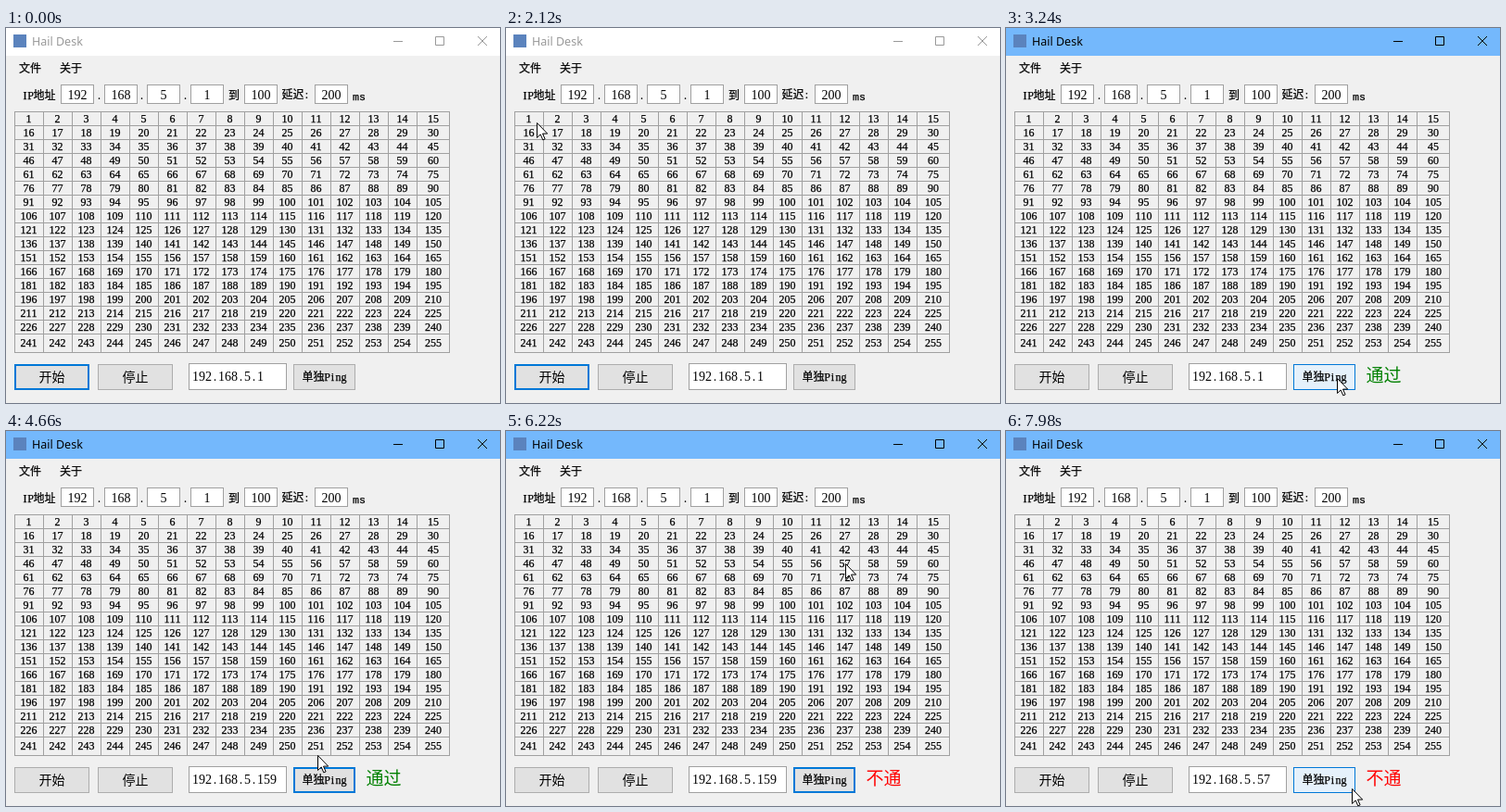
Animation of 533x405 px, one loop 8 s. Source, as an HTML page:

```html
<!DOCTYPE html>
<html lang="zh">
<head>
<meta charset="utf-8">
<title>Hail Desk</title>
<style>
  html, body { margin: 0; width: 100%; height: 100%; overflow: hidden; background: #f0f0f0; }
  svg { display: block; width: 533px; height: 405px; }
  text { font-family: "Liberation Serif", "Noto Sans CJK SC", "Noto Sans CJK", serif; white-space: pre; }
  .ui { font-family: "Noto Sans", "Noto Sans CJK SC", "Noto Sans CJK", sans-serif; }
  .code { font-family: "Liberation Mono", monospace; }
  .ink { stroke: #000; stroke-width: .25px; }
</style>
</head>
<body>
<svg id="stage" viewBox="0 0 533 405"></svg>
<script>
const stage = document.getElementById("stage");
const LOOP = 8000;
const TICK = 110.6;
const BLUE = "#0078d7";
const EDGE = "#a0a0a0";

function add(tag, attrs, content = "") {
  const el = document.createElementNS("http://www.w3.org/2000/svg", tag);
  for (const name in attrs) el.setAttribute(name, attrs[name]);
  el.textContent = content;
  stage.append(el);
  return el;
}

// Wide characters take one em, Latin ones half an em, each centred in its cell.
const advance = (ch, size) => ch.charCodeAt(0) > 255 ? size : size / 2;

function setCells(el, value) {
  if (el.textContent === value) return;
  let pen = el.layout.x;
  const places = [...value].map(ch => {
    const w = advance(ch, el.layout.size);
    pen += w;
    return pen - w / 2;
  });
  el.textContent = value;
  el.setAttribute("x", places.join(" "));
}

function cells(value, x, y, size) {
  const el = add("text", {
    y, "font-size": size, "text-anchor": "middle", class: size === 12 ? "ink" : ""
  });
  el.layout = { x, size };
  setCells(el, value);
  return el;
}

function centred(value, mid, y, size) {
  const width = [...value].reduce((sum, ch) => sum + advance(ch, size), 0);
  return cells(value, mid - width / 2, y, size);
}

function box(x, y, width, height, fill, stroke) {
  return add("rect", { x: x + .5, y: y + .5, width, height, fill, stroke });
}

function button(x, width, label, size) {
  const face = box(x, 363, width, 27);
  const ring = box(x + 1, 364, width - 2, 25, "none", BLUE);
  centred(label, x + width / 2 + .5, 376.5 + size * .36, size);
  return state => {
    const [fill, edge] = {
      normal: ["#e1e1e1", "#adadad"],
      focus: ["#e1e1e1", BLUE],
      hover: ["#e5f1fb", BLUE],
      press: ["#cce4f7", "#005499"]
    }[state];
    face.setAttribute("fill", fill);
    face.setAttribute("stroke", edge);
    ring.setAttribute("visibility", state === "focus" ? "visible" : "hidden");
  };
}

// Window frame
add("rect", { width: 533, height: 405, fill: "#f0f0f0" });
const bar = add("rect", { width: 533, height: 30 });
add("rect", { x: 8, y: 7, width: 14, height: 14, fill: "#5b83bd" });
const title = add("text", { x: 28, y: 19, "font-size": 12.5, class: "ui" }, "Hail Desk");
const controls = add("path", {
  d: "M418 14.5h10M463.5 9.5h9v9h-9zM509 9l10 10M519 9l-10 10", fill: "none"
});
add("text", { x: 14, y: 47.5, "font-size": 12, class: "ui ink" }, "文件");
add("text", { x: 58, y: 47.5, "font-size": 12, class: "ui ink" }, "关于");

// Address row
function field(x, value) {
  box(x, 61, 35, 20, "#fff", EDGE);
  centred(value, x + 18, 76.5, 14);
}
cells("IP地址", 17.5, 77, 12);
["192", "168", "5", "1"].forEach((part, i) => {
  const x = 59 + Math.round(46.7 * i);
  field(x, part);
  if (i) cells(".", x - 9, 77, 14);
});
cells("到", 240, 77, 12);
field(257, "100");
cells("延迟:", 297.5, 76, 12);
field(333, "200");
add("text", { x: 374, y: 77.5, "font-size": 11.7, class: "code ink" }, "ms");

// Host grid: the last column and row are slightly larger
let lines = "M478.5 90v261M9 350.5h470";
for (let c = 0; c < 15; c++) lines += `M${9.5 + 31 * c} 90v261`;
for (let r = 0; r < 17; r++) lines += `M9 ${90.5 + 15 * r}h470`;
add("path", { d: lines, stroke: EDGE });

function hostSpot(n) {
  const col = (n - 1) % 15, row = Math.floor((n - 1) / 15);
  return [col < 14 ? 24.5 + 31 * col : 461, row < 16 ? 98 + 15 * row : 340];
}
for (let n = 1; n <= 255; n++) {
  const [x, y] = hostSpot(n);
  centred(String(n), x, y + 4, 12);
}

// Bottom row
const setStart = button(9, 80, "开始", 14);
button(99, 80, "停止", 14)("normal");
box(197, 362, 105, 28, "#fff", EDGE);
const address = cells("", 201, 381, 14);
const setPing = button(310, 66, "单独Ping", 12);
const status = cells("", 388.5, 382, 19);

const pointer = add("path", {
  d: "M.5.5v16l3.7-3.6 2.6 6 2.3-1-2.6-5.8h5.2z", fill: "#fff", stroke: "#000"
});

// The story, in ticks: pointer moves, host picks and pings
const moves = [
  { from: -8, to: -7, spot: [497, 378] },
  { from: -7, to: -2, spot: [513, 360] },
  { from: -1, to: 12, spot: [33, 102] },
  { from: 13, to: 22, spot: [357, 378] },
  { from: 24, to: 26, spot: [357, 383] },
  { from: 27, to: 32, spot: hostSpot(159) },
  { from: 33, to: 37, spot: [357, 384] },
  { from: 39, to: 41, spot: [379, 283] },
  { from: 41, to: 49, spot: hostSpot(57) },
  { from: 51, to: 57, spot: [356, 381] },
  { from: 60, to: 65, spot: [373, 386] }
];
const picks = [{ at: -8, host: 1 }, { at: 32, host: 159 }, { at: 51, host: 57 }];
const pings = [
  { at: 20, reply: 21, text: "通过" },
  { at: 37, reply: 43, text: "不通" },
  { at: 56, reply: 61, text: "不通" }
];
const WAKE = 13;

const latest = (list, k) => list.filter(item => item.at <= k).pop();
const easeOut = f => 1 - (1 - f) ** 2;

function pointerAt(k) {
  let at = moves[0].spot;
  for (const { from, to, spot } of moves) {
    const f = easeOut(Math.min(1, Math.max(0, (k - from) / (to - from))));
    at = at.map((v, i) => v + (spot[i] - v) * f);
  }
  return at.map(Math.round);
}

function statusAt(k) {
  const ping = latest(pings, k - 1);
  if (!ping) return "";
  return k < ping.reply ? "正在Ping" : ping.text;
}

function draw(t) {
  const k = Math.floor((t - 780) / TICK);
  const active = k >= WAKE, focused = k >= pings[0].at;
  const [x, y] = pointerAt(k);
  const over = x >= 310 && x <= 376 && y >= 363 && y <= 390;
  const pressed = pings.some(ping => ping.at === k);

  bar.setAttribute("fill", active ? "#74b8fc" : "#fff");
  title.setAttribute("fill", active ? "#000" : "#999");
  controls.setAttribute("stroke", active ? "#000" : "#999");
  pointer.setAttribute("visibility", t >= 100 ? "visible" : "hidden");
  pointer.setAttribute("transform", `translate(${x} ${y})`);

  setStart(focused ? "normal" : "focus");
  setPing(pressed ? "press" : over ? "hover" : focused ? "focus" : "normal");
  setCells(address, "192.168.5." + latest(picks, k).host);
  const message = statusAt(k);
  setCells(status, message);
  status.setAttribute("fill", message === "不通" ? "#f00" : "#008000");
}

const began = performance.now();
function frame() {
  draw((performance.now() - began) % LOOP);
  requestAnimationFrame(frame);
}
draw(0);
requestAnimationFrame(frame);
</script>
</body>
</html>
```
